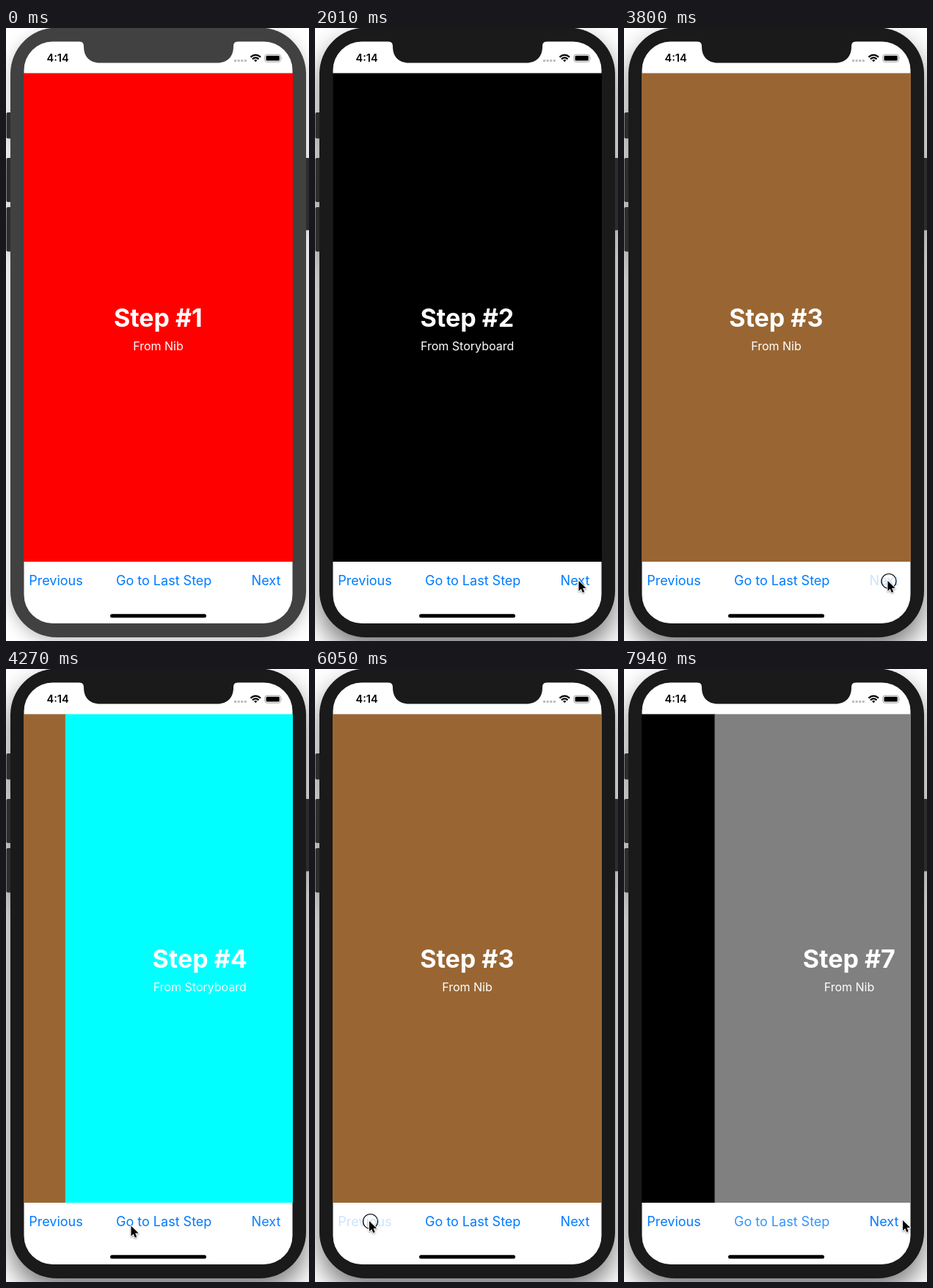
An HTML page that plays this animation: 413 by 835 pixels, repeating every 8000 ms.

```html
<!DOCTYPE html>
<html lang="en">
<head>
<meta charset="utf-8">
<title>Step pager</title>
<style>
  html, body { margin: 0; width: 100%; height: 100%; overflow: hidden; background: #fff; }
  svg { display: block; width: 413px; height: 835px; font-family: Inter, "Open Sans", sans-serif; font-optical-sizing: none; }
  #phone { filter: drop-shadow(0 6px 10px rgba(0, 0, 0, .24)); }
  #keys { fill: #2c2c2c; }
  .shell { fill: #414141; }
  .active #phone { filter: drop-shadow(0 17px 17px rgba(0, 0, 0, .52)); }
  .active .shell { fill: #1a1a1a; }
  .page text { fill: #fff; text-anchor: middle; }
  .title { font-size: 34px; font-weight: 700; }
  .sub { font-size: 16px; }
  .btn { font-size: 18px; fill: #007aff; }
  .clock { font-size: 14.5px; font-weight: 600; }
  #arrow { stroke: #fff; stroke-width: 1.8; stroke-linejoin: round; paint-order: stroke; filter: drop-shadow(0 1px 1px rgba(0, 0, 0, .4)); }
</style>
</head>
<body>
<svg id="stage" viewBox="0 0 413 835">
  <defs>
    <clipPath id="view"><rect x="24" y="61.5" width="367" height="665.5"/></clipPath>
  </defs>

  <g id="phone">
    <g id="keys">
      <rect x="0.5" y="115" width="9" height="35.5" rx="2"/>
      <rect x="0.5" y="177" width="9" height="60" rx="2"/>
      <rect x="0.5" y="244" width="9" height="60.5" rx="2"/>
      <rect x="405" y="177" width="9" height="98.5" rx="2"/>
    </g>
    <rect class="shell" x="6" y="-0.5" width="403" height="830.5" rx="63"/>
  </g>

  <rect x="24.5" y="18.5" width="366" height="792.5" rx="39" fill="#fff"/>
  <path class="shell" d="M99 18 C104 18.500 106 20.500 106 25 C106 39 114 47.500 128 47.500 H288 C302 47.500 310 39 310 25 C310 20.500 312 18.500 317 18 Z"/>

  <text class="clock" x="55.5" y="46">4:14</text>
  <path d="M311 44.500 h17" stroke="#bdbdbd" stroke-width="3" stroke-dasharray="3 1.6"/>
  <g fill="none" stroke="#000" stroke-width="2.2">
    <path d="M333.400 39.600 Q340.200 33.600 347 39.600"/>
    <path d="M335.900 42.300 Q340.200 38.600 344.500 42.300"/>
    <path d="M338 43.800 Q340.200 42.200 342.400 43.800 L340.200 46.200 Z" fill="#000" stroke="none"/>
  </g>
  <rect x="352.9" y="36.2" width="21.4" height="10" rx="2.8" fill="none" stroke="#a0a0a0"/>
  <rect x="354.5" y="37.8" width="18.2" height="6.8" rx="1.4"/>
  <path d="M375.300 39.600 q1.300 1.500 0 3.200 z" fill="#a0a0a0"/>

  <g id="pages" clip-path="url(#view)"></g>

  <text class="btn" id="prev" x="31.2" y="759">Previous</text>
  <text class="btn" id="last" x="215.2" y="759" text-anchor="middle">Go to Last Step</text>
  <text class="btn" id="next" x="374.3" y="759" text-anchor="end">Next</text>
  <rect x="142" y="798.3" width="131" height="5" rx="2.5"/>

  <circle id="ring" r="10" fill="none" stroke="#000" stroke-width="1.2"/>
  <path id="arrow" d="M0 0 V14 L3.200 11 L5.300 15.900 L7.700 14.900 L5.600 10.100 H10.100 Z"/>
</svg>

<script>
const LOOP = 8000, TICK = 118, WIDTH = 366;
const SLIDE = 560, FADE = 360, HOLD = 168, FOCUS = 1060;
const $ = id => document.getElementById(id);
const clamp = v => Math.min(1, Math.max(0, v));
const smooth = v => (v = clamp(v), v * v * (3 - 2 * v));

const colors = { 1: '#f00', 2: '#000', 3: '#963', 4: '#0ff', 7: '#808080' };
$('pages').innerHTML = Object.keys(colors).map(n => `
  <g class="page" id="page${n}">
    <rect x="24" y="61" width="${WIDTH + 1}" height="667" fill="${colors[n]}"/>
    <text class="title" x="207.3" y="407">Step #${n}</text>
    <text class="sub" x="207.5" y="439">From ${n % 2 ? 'Nib' : 'Storyboard'}</text>
  </g>`).join('');

// Each visit: slide start, step shown
const visits = [[1460, 2], [2833, 3], [3942, 4], [4965, 3], [6165, 2], [7663, 7]];
const slides = visits.map(([start, to], i) => {
  const from = i ? visits[i - 1][1] : 1;
  const button = to < from ? 'prev' : to > from + 1 ? 'last' : 'next';
  return { start, down: start - HOLD, from, to, button };
});
const taps = [FOCUS, ...slides.map(s => s.down)];

// Pointer legs: begin, end, destination
const entry = { t: 472, x: 373, y: 729 };
const legs = [
  [472, 826, 359.5, 753],
  [3894, 4248, 170.5, 758.5],
  [4390, 4838, 74, 752],
  [6372, 7080, 350, 751],
  [7100, 7434, 180, 751],
  [7600, 7906, 380, 751]
];

// Default scroll curve: cubic-bezier(.25, .1, .25, 1), solved for x by bisection
function ease(v) {
  const curve = (a, b, u) => 3 * a * u * (1 - u) ** 2 + 3 * b * u * u * (1 - u) + u ** 3;
  let lo = 0, hi = 1;
  for (let i = 0; i < 24; i++) {
    const mid = (lo + hi) / 2;
    if (curve(.25, .25, mid) < clamp(v)) lo = mid; else hi = mid;
  }
  return curve(.1, 1, hi);
}

function pointer(t) {
  let { x, y } = entry;
  for (const [begin, end, toX, toY] of legs) {
    const k = smooth((t - begin) / (end - begin));
    x += (toX - x) * k;
    y += (toY - y) * k;
  }
  return [x, y];
}

const show = (el, on) => { el.style.display = on ? '' : 'none'; };
const move = (el, x, y) => el.setAttribute('transform', `translate(${x.toFixed(2)} ${y.toFixed(2)})`);

function place(n, x) {
  show($('page' + n), true);
  move($('page' + n), x, 0);
}

function draw(time) {
  // Motion advances at a low, steady frame rate.
  const t = Math.floor(time / TICK) * TICK;
  $('stage').classList.toggle('active', t >= FOCUS);

  for (const n in colors) show($('page' + n), false);
  const slide = slides.findLast(s => t >= s.start);
  if (slide) {
    const p = ease((t - slide.start) / SLIDE);
    const dir = Math.sign(slide.to - slide.from);
    if (p < .999) place(slide.from, -dir * WIDTH * p);
    place(slide.to, dir * WIDTH * (1 - p));
  } else place(1, 0);

  for (const id of ['prev', 'last', 'next']) {
    const press = slides.findLast(s => s.button === id && t >= s.down);
    $(id).style.opacity = press ? .2 + .8 * smooth((t - press.start) / FADE) : 1;
  }

  const [x, y] = pointer(t);
  show($('arrow'), t >= entry.t);
  move($('arrow'), x, y);
  show($('ring'), taps.some(tap => t >= tap && t < tap + TICK));
  move($('ring'), x + 1.5, y + .5);
}

const origin = performance.now();
function loop() {
  draw((performance.now() - origin) % LOOP);
  requestAnimationFrame(loop);
}
loop();
</script>
</body>
</html>
```
